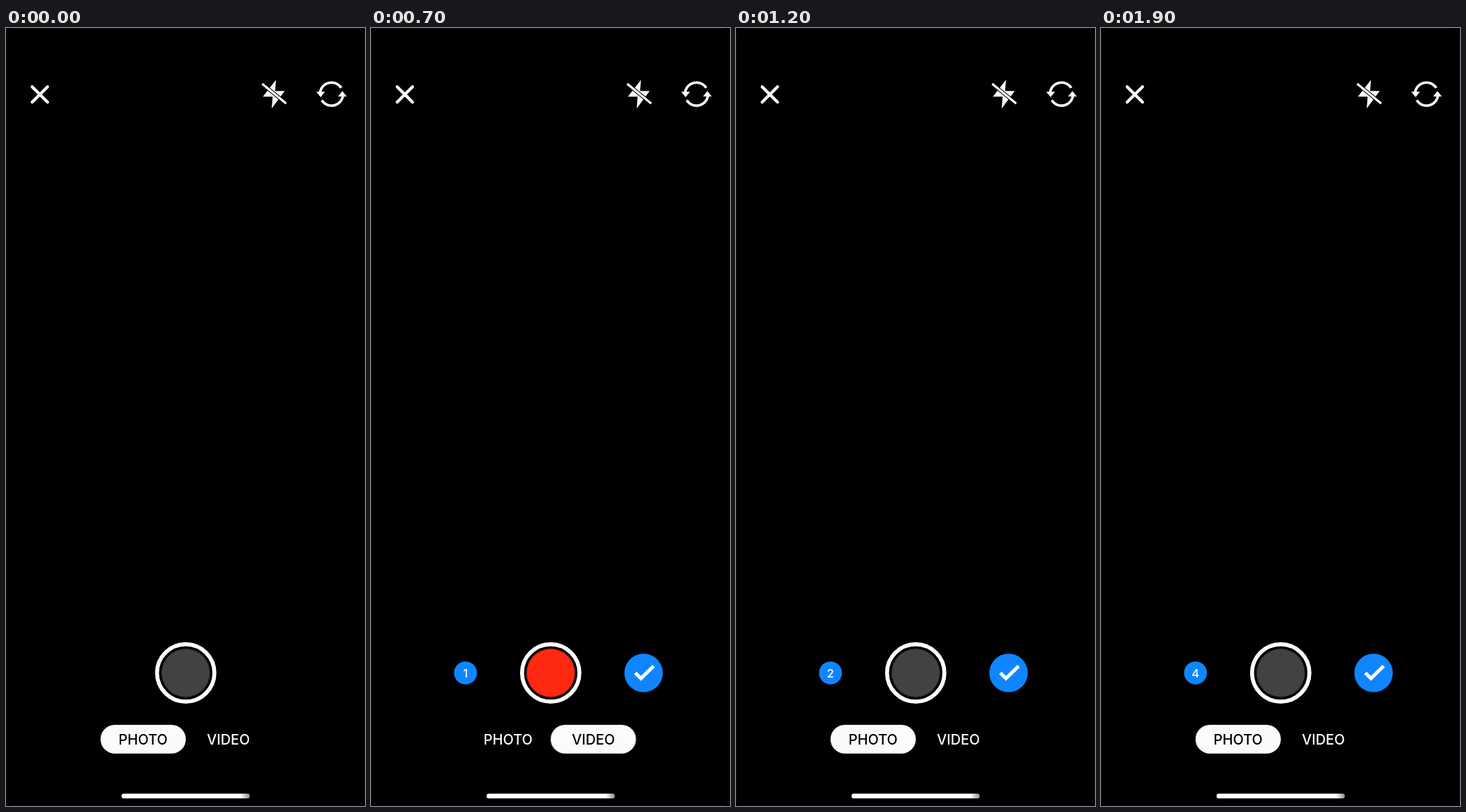
Animation of 508 by 1102 pixels, one loop 2000 ms. Source, as an HTML page:

```html
<!DOCTYPE html>
<html lang="en">
<head>
<meta charset="utf-8">
<title>Camera capture</title>
<style>
  html, body { margin: 0; width: 100%; height: 100%; overflow: hidden; background: #000; }
  svg { display: block; width: 508px; height: 1102px; }
  text { font-family: Inter, "Open Sans", sans-serif; text-anchor: middle; font-weight: 500; }
  .mode { font-size: 19.8px; }
  .line { fill: none; stroke: #fff; }

  .badge, .done, .digits, .shutter, .pill, .photo, .video {
    animation: 2s step-end infinite;
  }
  .badge, .done { animation-name: show; }
  .digits { animation-name: count; }
  .shutter { animation-name: press; }
  .pill { animation-name: slide; }
  .photo { animation-name: photo; }
  .video { animation-name: video; }

  @keyframes show {
    0% { visibility: hidden; }
    10%, 100% { visibility: visible; }
  }
  @keyframes count {
    0% { transform: translateY(0); }
    55% { transform: translateY(-40px); }
    70% { transform: translateY(-80px); }
    90%, 100% { transform: translateY(-120px); }
  }
  @keyframes press {
    0%, 15%, 55%, 75%, 95%, 100% { transform: none; rx: 34.2px; }
    5%, 65%, 85% { transform: scale(.84); rx: 34.2px; }
    40% { transform: scale(.9); rx: 31px; }
    45% { transform: scale(.78); rx: 27.5px; }
    0%, 60%, 100% { fill: #434143; }
    30% { fill: #ff2911; }
  }
  @keyframes slide {
    0%, 60%, 100% { transform: none; }
    30% { transform: translateX(120.5px); }
  }
  @keyframes photo {
    0%, 60%, 100% { fill: #000; }
    30% { fill: #fff; }
  }
  @keyframes video {
    0%, 60%, 100% { fill: #fff; }
    30% { fill: #000; }
  }
</style>
</head>
<body>
<svg viewBox="0 0 508 1102">
  <defs>
    <linearGradient id="fade">
      <stop offset=".93" stop-color="#fff"/>
      <stop offset="1" stop-color="#8c8c8c"/>
    </linearGradient>
    <clipPath id="dot"><circle r="16.5"/></clipPath>
    <g id="turn">
      <path class="line" d="M-16.3 -1A16.3 16.3 0 0 1 13.8 -8.7" stroke-width="3.5"/>
      <path d="M-21.6 -3.3H-9.2L-15.4 4.4Z" fill="#fff"/>
    </g>
  </defs>

  <rect width="508" height="1102"/>
  <rect x=".5" y=".5" width="507" height="1101" rx="13" fill="none" stroke="#101010"/>

  <!-- close -->
  <path class="line" d="M37 83.2 58.8 105M58.8 83.2 37 105" stroke-width="4.2" stroke-linecap="round"/>

  <!-- flash off -->
  <path d="M382 73.5 363.5 97.3H377.3L376 114 394.3 89.3H380.8Z" fill="#fff"/>
  <path d="M362.5 79 396.5 107" stroke="#000" stroke-width="5.4"/>
  <path class="line" d="M362.5 79 396.5 107" stroke-width="3.2"/>

  <!-- flip camera -->
  <g transform="translate(460.6 93.6)">
    <use href="#turn"/>
    <use href="#turn" transform="rotate(180)"/>
  </g>

  <!-- shutter -->
  <g transform="translate(254.3 913.5)">
    <circle class="line" r="40.6" stroke-width="5.6"/>
    <rect class="shutter" x="-34.2" y="-34.2" width="68.4" height="68.4" rx="34.2"/>
  </g>

  <!-- shot counter -->
  <g transform="translate(133.7 913.5)">
    <g class="badge" clip-path="url(#dot)">
      <circle r="16.5" fill="#0f85ff"/>
      <g class="digits" font-size="16.5" fill="#fff">
        <text y="6">1</text>
        <text y="46">2</text>
        <text y="86">3</text>
        <text y="126">4</text>
      </g>
    </g>
  </g>

  <!-- confirm -->
  <g class="done">
    <circle cx="385.7" cy="913.5" r="27.2" fill="#0f85ff"/>
    <path class="line" d="M374 913.5 382 921.3 400 903.8" stroke-width="5"/>
  </g>

  <!-- mode switch -->
  <rect class="pill" x="133.7" y="987" width="120.8" height="40.8" rx="20.4" fill="#fbfbfb"/>
  <text class="mode photo" x="194" y="1014.5">PHOTO</text>
  <text class="mode video" x="314.7" y="1014.5">VIDEO</text>

  <rect x="163.5" y="1084.5" width="181.5" height="6.8" rx="3.4" fill="url(#fade)"/>
</svg>
</body>
</html>
```
